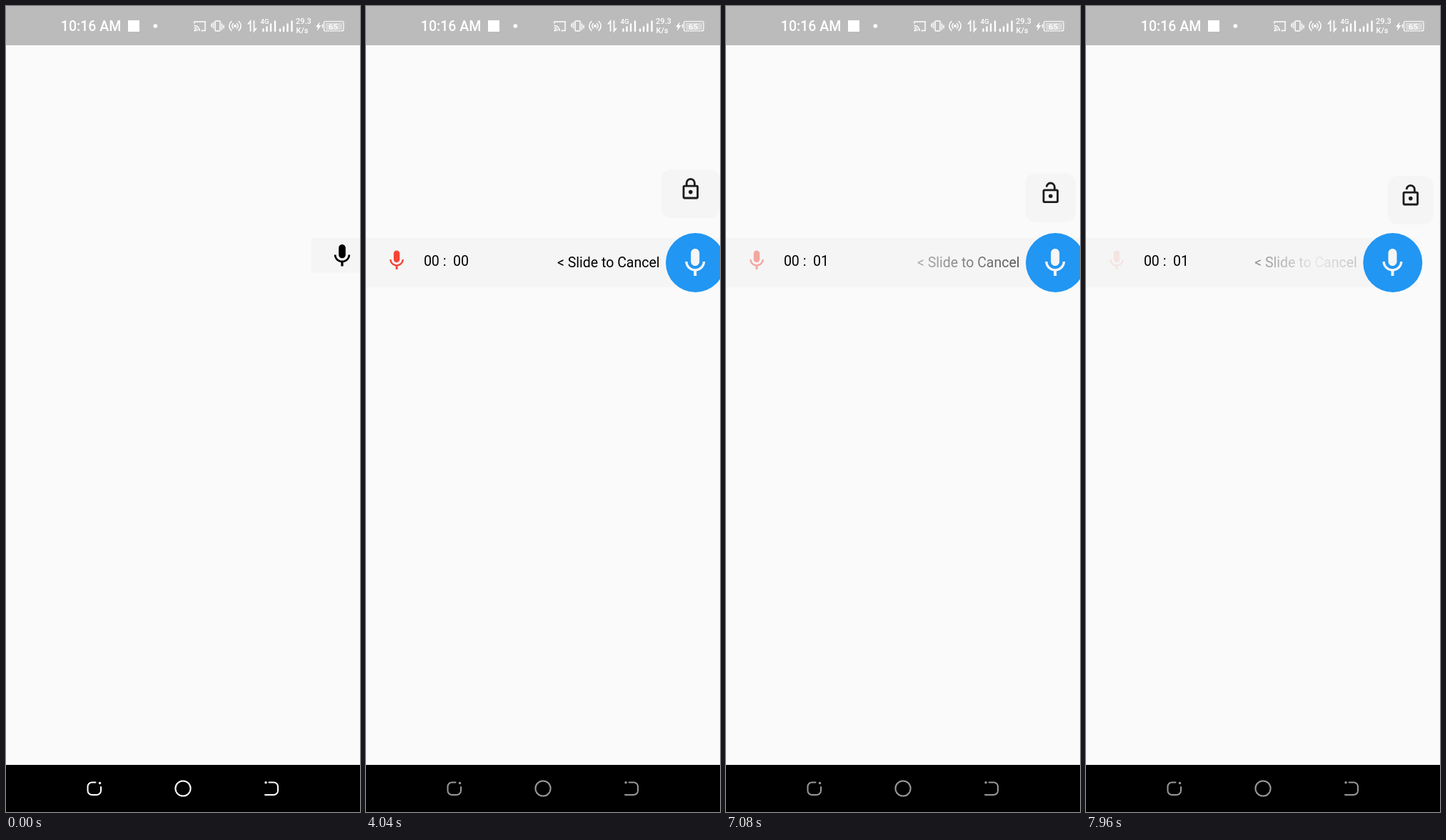
Write an HTML page that moves like this. It is 496 px wide and 1129 px high and loops after 8 s.

```html
<!DOCTYPE html>
<html lang="en">
<head>
<meta charset="utf-8">
<title>Voice recorder</title>
<style>
  html, body { margin: 0; width: 100%; height: 100%; overflow: hidden; background: #fafafa; }
  svg { display: block; font-family: Roboto, sans-serif; font-size: 19.5px; }
  text { white-space: pre; }
  .line { fill: none; stroke-linecap: round; }
</style>
</head>
<body>
<svg width="496" height="1129" viewBox="0 0 496 1129">
  <defs>
    <path id="mic" d="M12 14c1.66 0 3-1.34 3-3V5c0-1.66-1.34-3-3-3S9 3.34 9 5v6c0 1.66 1.34 3 3 3zM17.3 11c0 3-2.54 5.1-5.3 5.1S6.7 14 6.7 11H5c0 3.41 2.72 6.23 6 6.72V21h2v-3.28c3.28-.48 6-3.3 6-6.72z"/>
    <g id="bars">
      <path d="M360.5 32.5v2.5M365.5 29.5v5.5M371 25.5v9.5M377 21.5v13.500" stroke-width="2.4"/>
    </g>
    <linearGradient id="shine" gradientUnits="userSpaceOnUse" x1="268" x2="836">
      <stop/><stop/><stop stop-color="#000"/>
    </linearGradient>
  </defs>
  <rect width="496" height="1129" fill="#fafafa"/>

  <!-- status bar -->
  <rect width="496" height="55" fill="#bbb"/>
  <g fill="#fff">
    <text x="76.800" y="35" font-weight="500">10:16 AM</text>
    <rect x="171" y="20" width="16" height="16"/>
    <circle cx="209.300" cy="28" r="2.800"/>
    <text x="356.500" y="25" font-size="9.500" font-weight="500">4G</text>
    <text x="406" y="25" font-size="11" font-weight="500">29.3</text>
    <text x="406.500" y="38" font-size="11" font-weight="500">K/s</text>
    <path d="M439.500 22L434 29.500H437L436 35L441.500 27H438.500z"/>
    <rect x="447.500" y="23.500" width="23.500" height="10" fill-opacity=".4"/>
    <text x="452" y="32.500" font-size="11.500" font-weight="500">65</text>
    <circle cx="321" cy="28" r="2"/>
    <circle cx="265" cy="34" r="1.500"/>
  </g>
  <g class="line" stroke="#fff" stroke-width="1.500">
    <path d="M264 24V22H279V34.500H274M264 27.500a7 7 0 0 1 7 7M264 30.500a4 4 0 0 1 4 4"/>
    <path d="M288 25v4M290.500 23v8M305 27v4M302.500 25v8"/>
    <rect x="293" y="21" width="7" height="14" rx="1"/>
    <path d="M316 21.500a8.500 8.500 0 0 0 0 13M326 21.500a8.500 8.500 0 0 1 0 13M318.500 24.500a4.500 4.500 0 0 0 0 7M323.500 24.500a4.500 4.500 0 0 1 0 7"/>
    <path d="M339.500 25L342.500 21.500V35M347.500 21V35L350.500 31.500" stroke-width="1.800"/>
    <rect x="445.500" y="21.500" width="27.500" height="13.500" rx="2" stroke-width="1.200"/>
    <path d="M443.500 26v4"/>
    <use href="#bars"/><use href="#bars" x="23.500"/>
  </g>

  <!-- idle button -->
  <g id="idle">
    <rect x="428" y="325" width="68" height="48.500" fill="#f5f5f5"/>
    <use href="#mic" transform="translate(451.800 330.800) scale(1.600)"/>
  </g>

  <!-- recording panel -->
  <g id="rec">
    <rect id="bar" y="325" fill="#f5f5f5"/>
    <rect id="panel" height="68" rx="14" fill="#f5f5f5"/>
    <g id="lock" fill="none" stroke="#1c1c1f" stroke-width="2">
      <rect x="5" y="9" width="14" height="12" rx="1"/>
      <path id="shackle"/>
      <circle cx="12" cy="15" r="2" fill="#1c1c1f" stroke="none"/>
    </g>
    <use id="redMic" href="#mic" fill="#f44336" transform="translate(26.200 339.700) scale(1.400)"/>
    <text id="timer" x="80.900" y="363.700"></text>
    <text id="hint" x="268" y="366.200" fill="url(#shine)">&lt; Slide to Cancel</text>
    <circle id="disc" fill="#2196f3"/>
    <use id="bigMic" href="#mic" fill="#f5f5f5"/>
  </g>

  <!-- navigation bar -->
  <rect y="1063" width="496" height="66" fill="#000"/>
  <g id="nav" stroke-width="2">
    <path class="line" d="M125.500 1087.500H120.500a6 6 0 0 0-6 6v5.500a6 6 0 0 0 6 6h6.500a6 6 0 0 0 6-6v-5M368.500 1087.500H375a6 6 0 0 1 6 6v5.500a6 6 0 0 1-6 6H363"/>
    <circle class="line" cx="248" cy="1096" r="10.600"/>
    <circle cx="131.500" cy="1088.500" r="1.700" stroke="none"/>
    <circle cx="364" cy="1087.700" r="1.700" stroke="none"/>
  </g>
</svg>
<script>
const LOOP = 8000, RECORD = 3640, GROW = 3760, TICK = 5620, DRAG = 7588;
const $ = id => document.getElementById(id);
const clamp = v => Math.min(1, Math.max(0, v));
const grey = v => `rgb(${v},${v},${v})`;
const stops = document.querySelectorAll('#shine stop');

function set(id, attrs) {
  for (const key in attrs) $(id).setAttribute(key, attrs[key]);
}

// Light band at c (in text widths) with a long dark tail on its right.
function shine(c) {
  const inside = c > 0, peak = inside ? 232 : Math.max(0, 232 + 88 * c);
  stops[0].setAttribute('stop-color', grey(inside ? 140 : peak));
  stops[1].setAttribute('stop-color', grey(peak));
  stops[1].setAttribute('offset', Math.max(0, c) / 4);
  stops[2].setAttribute('offset', clamp((c + 2.65) / 4));
}

function draw(t) {
  const recording = t >= RECORD;
  const grow = t < GROW ? 0 : clamp((t - 3700) / 340);
  const since = Math.max(0, t - TICK);
  const fade = clamp(since / 2600);
  const drag = Math.max(0, t - DRAG) * 0.085;
  const cx = 472 - 10.5 * grow - drag;
  const inset = 10 * fade;

  const navColor = t < 160 ? '#fff' : '#999';
  set('nav', { stroke: navColor, fill: navColor });
  set('idle', { visibility: recording ? 'hidden' : 'visible' });
  set('rec', { visibility: recording ? 'visible' : 'hidden' });

  set('bar', { width: cx + 34, height: 54.5 + 14 * grow });
  set('panel', { x: 413.7 + inset, y: 229 + inset, width: 82 - 2 * inset });
  set('lock', { transform: `translate(438 ${239.6 + inset}) scale(1.4)` });
  set('shackle', { d: `M16 9V6a4 4 0 0 0-8 0${t < TICK + 40 ? 'V9' : ''}` });
  set('redMic', { opacity: 1 - fade });
  $('timer').textContent = t < TICK ? '00 :  00' : '00 :  01';

  set('hint', {
    opacity: t < GROW ? 0 : 1,
    transform: `translate(${23 * (1 - grow) - drag} ${-7 * (1 - grow)})`
  });
  shine(-2.75 + 1.43 * since / 1000);
  set('disc', { cx, cy: 349 + 10.5 * grow, r: 29 + 12.5 * grow });
  set('bigMic', { transform: `translate(${cx - 25 + 0.7 * grow} ${326 + 10 * grow}) scale(2)` });
}

const start = performance.now();
function frame() {
  draw((performance.now() - start) % LOOP);
  requestAnimationFrame(frame);
}
frame();
</script>
</body>
</html>
```
